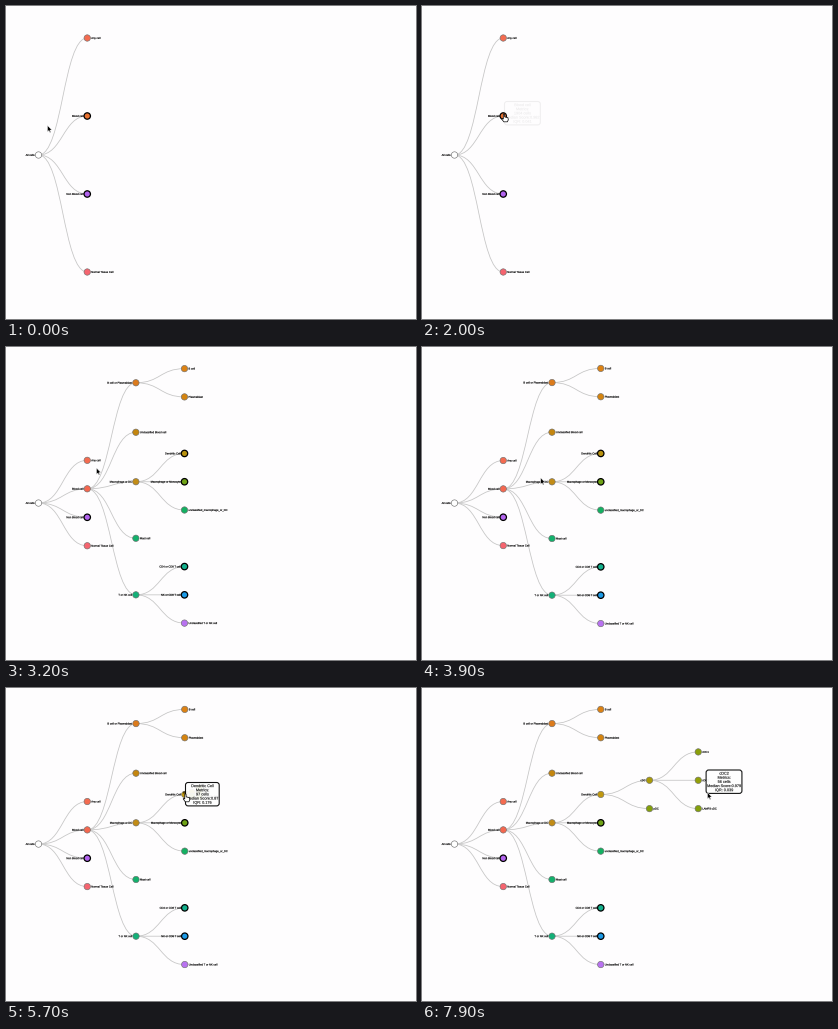
Recreate the animation shown at these times as a matplotlib script. Size 410 by 313 pixels, loop 8 s.

```python
import matplotlib.pyplot as plt
import numpy as np
from matplotlib.animation import FuncAnimation
from matplotlib.patches import Circle, FancyBboxPatch, PathPatch, Polygon
from matplotlib.path import Path
from matplotlib.textpath import TextPath
from matplotlib.transforms import Affine2D

W, H, DPI = 410, 313, 64
PX = 72 / DPI
STEP, FRAMES = 100, 80
FONT = {"family": "Liberation Sans"}
LABEL, TIP = 2.64, 3.8

# Times at which a node is clicked open, and how long the tree takes to settle
OPEN_BLOOD, OPEN_DENDRITIC, SETTLE = 2515, 5450, 750
NEVER = 10 ** 6

# name, parent, depth, row, fill, label side, generation
NODES = [
    ("All cells", None, 0, 4.75, "#ffffff", -1, 0),
    ("Any cell", 0, 1, 3.25, "#f46b50", 1, 0),
    ("Blood cell", 0, 1, 4.25, "#f4674f", -1, 0),
    ("Non Blood cell", 0, 1, 5.25, "#b264ee", -1, 0),
    ("Normal Tissue Cell", 0, 1, 6.25, "#f5646f", 1, 0),
    ("B cell or Plasmablast", 2, 2, 0.5, "#dc7b1c", -1, 1),
    ("Unclassified Blood cell", 2, 2, 2.25, "#c4860f", 1, 1),
    ("Macrophage or DC", 2, 2, 4, "#c28c16", -1, 1),
    ("Mast cell", 2, 2, 6, "#14b06c", 1, 1),
    ("T or NK cell", 2, 2, 8, "#14b078", -1, 1),
    ("B cell", 5, 3, 0, "#dc8214", 1, 1),
    ("Plasmablast", 5, 3, 1, "#d48410", 1, 1),
    ("Dendritic Cell", 7, 3, 3, "#c0980f", -1, 1),
    ("Macrophage or Monocyte", 7, 3, 4, "#6fa316", -1, 1),
    ("unclassified_macrophage_or_DC", 7, 3, 5, "#14b062", 1, 1),
    ("CD4 or CD8 T cell", 9, 3, 7, "#12b08c", -1, 1),
    ("NK or CD8 T cell", 9, 3, 8, "#1c9ae6", -1, 1),
    ("Unclassified T or NK cell", 9, 3, 9, "#b872f0", 1, 1),
    ("cDC", 12, 4, 2.5, "#a99a08", -1, 2),
    ("pDC", 12, 4, 3.5, "#84a00c", 1, 2),
    ("cDC1", 18, 5, 1.5, "#8a9f0a", 1, 2),
    ("cDC2", 18, 5, 2.5, "#93a00a", 1, 2),
    ("LAMP3 cDC", 18, 5, 3.5, "#84a00c", 1, 2),
]
FIRST_Y = [149, 32, 110, 188, 266]

# Nodes with hidden children: closed until, fill while closed
CLOSED = {
    "Blood cell": (OPEN_BLOOD, "#ea7230"),
    "Non Blood cell": (NEVER, "#b264ee"),
    "Dendritic Cell": (OPEN_DENDRITIC, "#b9920f"),
    "Macrophage or Monocyte": (NEVER, "#6fa316"),
    "CD4 or CD8 T cell": (NEVER, "#12b08c"),
    "NK or CD8 T cell": (NEVER, "#1c9ae6"),
}

# from, to, fade out time, left, top, lines
TIPS = [
    (750, 1200, 500, 32, 140,
     ["All cells", "Metrics:", "2897 cells", "Median Score:", "IQR:"]),
    (1950, 2600, 1, 82, 95,
     ["Blood cell", "Metrics:", "1904 cells", "Median Score:0.982", "IQR: 0.041"]),
    (2500, 2700, 500, 82, 95,
     ["Unclassified Blood cell", "Metrics:", "16 cells",
      "Median Score:0.473", "IQR: 0.076"]),
    (3950, 4650, 500, 127.2, 123,
     ["Macrophage or DC", "Metrics:", "735 cells", "Median Score:0.898", "IQR: 0.064"]),
    (5150, 6150, 500, 179, 94,
     ["Dendritic Cell", "Metrics:", "97 cells", "Median Score:0.87", "IQR: 0.176"]),
    (7250, 7850, 500, 283.6, 81.5,
     ["cDC2", "Metrics:", "56 cells", "Median Score:0.979", "IQR: 0.039"]),
]

# time, x, y of the pointer
PATH = [
    (0, 41.5, 119.5), (900, 32, 150.5), (1200, 32, 150.5), (1900, 82, 108),
    (2750, 82, 109), (3200, 90.5, 121), (3500, 92, 122), (4100, 128, 134),
    (4400, 128, 134), (4700, 150, 113), (5250, 179.5, 106), (5900, 179.5, 106),
    (6400, 240, 132), (6700, 250, 137), (7250, 283, 93.5), (7600, 283, 93.5),
    (7900, 285.5, 104.5),
]
ARROW = [(0, 0), (0, 6.3), (1.4, 5), (2.4, 7.1), (3.4, 6.7), (2.4, 4.6), (4.4, 4.5)]
HAND = [(-.7, 0), (.5, 0), (.7, 2.9), (3.9, 3.6), (4.3, 5.8), (3.4, 7.8),
        (-.2, 7.8), (-2.4, 4.9), (-1.6, 4.3), (-.7, 5.1)]


def ease(t):
    t = min(max(t, 0), 1)
    return 4 * t ** 3 if t < .5 else 1 - 4 * (1 - t) ** 3


def text_path(text, size, x, y, align):
    """Text outline; align 0, .5 or 1 puts its left, middle or right at x."""
    path = TextPath((0, 0), text, size=size, prop=FONT)
    width = path.get_extents().x1
    move = Affine2D().scale(1, -1).translate(x - align * width, y)
    return move.transform_path(path), width


fig = plt.figure(figsize=(W / DPI, H / DPI), dpi=DPI, facecolor="#fefdfe")
ax = fig.add_axes([0, 0, 1, 1])
ax.set_xlim(0, W)
ax.set_ylim(H, 0)
ax.axis("off")


def home(depth, row):
    return np.array([32.5 + 48.75 * depth, 21.4 + 28.35 * row])


class Node:
    def __init__(self, index, spec):
        self.name, self.parent, depth, row, self.fill, side, gen = spec
        self.end = home(depth, row)
        self.opens = OPEN_DENDRITIC if gen == 2 else OPEN_BLOOD
        self.born = self.opens if gen else -1
        if gen == 0:
            self.start = np.array([self.end[0], FIRST_Y[index]])
        elif gen == 1:
            self.start = np.array([home(1, 0)[0], FIRST_Y[2]])
        else:
            self.start = home(3, 3)

        z = 2 + index * .01
        self.dot = ax.add_patch(Circle((0, 0), 3.2, zorder=z))
        path, _ = text_path(self.name, LABEL, 4 * side, .92, (1 - side) / 2)
        self.label = ax.add_patch(
            PathPatch(path, fc="k", ec="k", lw=.12 * PX, zorder=z + .005))
        self.link = None
        if self.parent is not None:
            self.link = ax.add_patch(PathPatch(
                Path([(0, 0)]), fc="none", ec="#c6c6c6", lw=.8 * PX, zorder=1))

    def pos(self, ms):
        p = ease((ms - self.opens) / SETTLE)
        return self.start + (self.end - self.start) * p

    def update(self, ms):
        shown = ms >= self.born
        for part in (self.dot, self.label, self.link):
            if part:
                part.set_visible(shown)
        if not shown:
            return
        x, y = self.pos(ms)
        self.dot.center = x, y
        until, fill = CLOSED.get(self.name, (-1, None))
        closed = ms < until
        self.dot.set_facecolor(fill if closed else self.fill)
        self.dot.set_edgecolor("#000000" if closed else "#6e6e6e")
        self.dot.set_linewidth((1.25 if closed else .6) * PX)
        self.label.set_transform(Affine2D().translate(x, y) + ax.transData)
        if self.link:
            px, py = nodes[self.parent].pos(ms)
            mid = (x + px) / 2
            self.link.set_path(Path([(px, py), (mid, py), (mid, y), (x, y)],
                                    [1, 4, 4, 4]))


class Tip:
    def __init__(self, start, stop, fade, left, top, lines):
        self.start, self.stop, self.fade = start, stop, fade
        width = 3 + max(text_path(s, TIP, 0, 0, 0)[1] for s in lines)
        rows = [text_path(s, TIP, left + width / 2, top + 5.1 + 4.15 * k, .5)[0]
                for k, s in enumerate(lines)]
        self.box = ax.add_patch(FancyBboxPatch(
            (left + .5, top + .5), width - 1, 23.4,
            boxstyle="round,pad=0,rounding_size=2.6",
            fc="w", ec="k", lw=1.1 * PX, zorder=5))
        self.text = ax.add_patch(PathPatch(
            Path.make_compound_path(*rows), fc="k", ec="k", lw=.1 * PX, zorder=6))

    def update(self, ms):
        grow = ease((ms - self.start) / 200)
        alpha = .93 * grow * (1 - ease((ms - self.stop) / self.fade))
        for part in (self.box, self.text):
            part.set_visible(alpha > .01)
            part.set_alpha(alpha)


nodes = [Node(i, spec) for i, spec in enumerate(NODES)]
tips = [Tip(*spec) for spec in TIPS]
arrow = ax.add_patch(Polygon(ARROW, fc="k", ec="w", lw=.4 * PX, zorder=9))
hand = ax.add_patch(Polygon(HAND, fc="w", ec="k", lw=.7 * PX, zorder=9))


def pointer(ms):
    for (t0, *a), (t1, *b) in zip(PATH, PATH[1:]):
        if ms <= t1:
            u = (ms - t0) / (t1 - t0)
            u = u * u * (3 - 2 * u)
            return np.array(a) + (np.array(b) - a) * u
    return np.array(PATH[-1][1:])


def draw(frame):
    ms = frame * STEP
    for item in nodes + tips:
        item.update(ms)
    place = Affine2D().translate(*pointer(ms)) + ax.transData
    over = any(tip.start <= ms < tip.stop for tip in tips)
    for shape, shown in ((arrow, not over), (hand, over)):
        shape.set_transform(place)
        shape.set_visible(shown)
    return []


anim = FuncAnimation(fig, draw, frames=FRAMES, interval=STEP, repeat=True)
plt.show()
```
